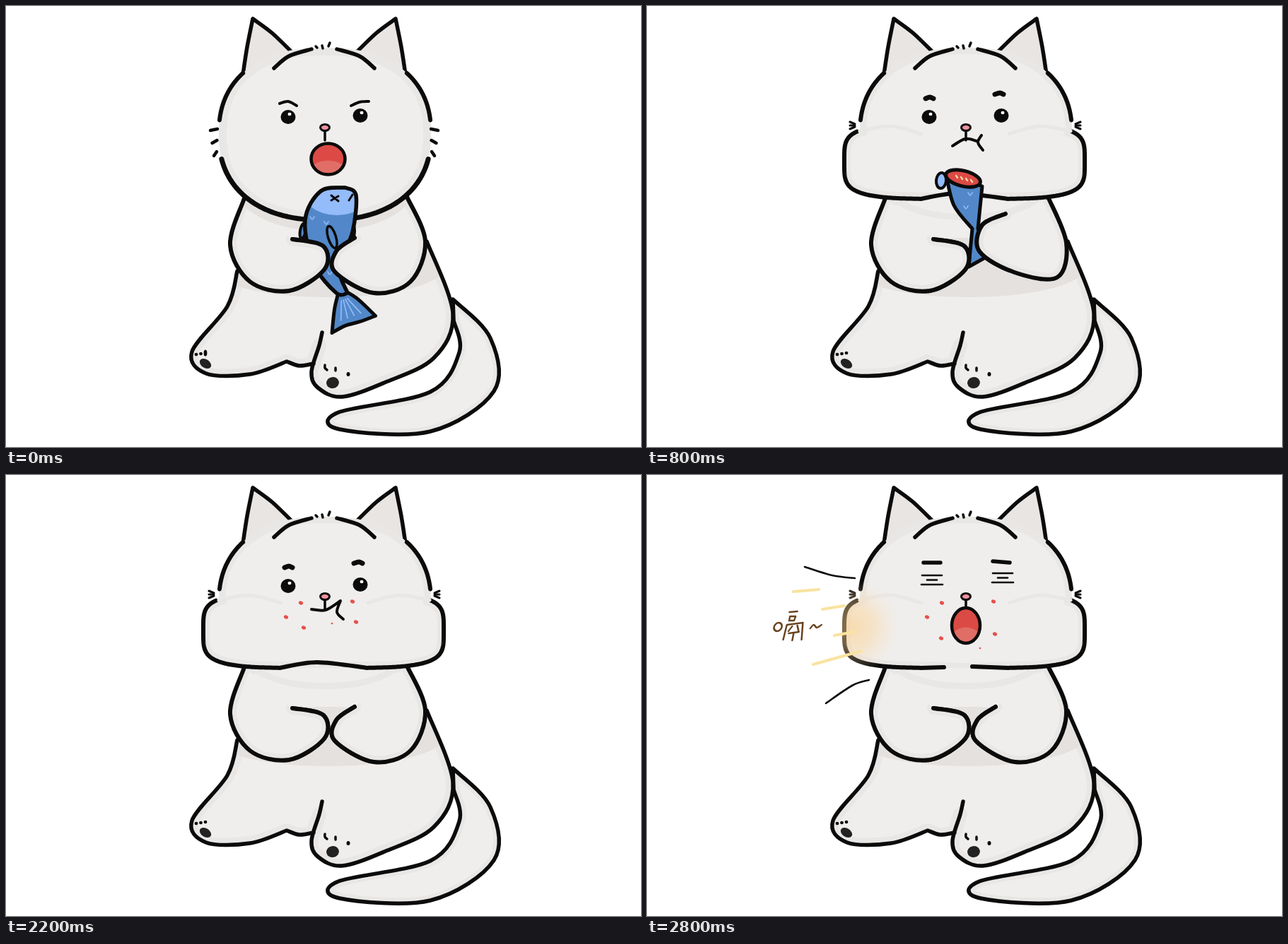
These frames come from a looping animation (898 px wide and 624 px high, 3 s). An HTML page with a canvas:

```html
<!DOCTYPE html>
<html lang="en">
<head>
<meta charset="utf-8">
<title>Cat eats a fish</title>
<style>
  html, body { margin: 0; width: 100%; height: 100%; overflow: hidden; background: #fff; }
  canvas { display: block; width: 898px; height: 624px; }
</style>
</head>
<body>
<canvas width="898" height="624" role="img" aria-label="A cat eats a fish and burps: 嗝~"></canvas>
<script>
const ctx = document.querySelector('canvas').getContext('2d');
const INK = '#0b0b0b', FUR = '#efeeec', SHADE = '#e4e1df', RIM = '#e9e7e5';
const BLUE = '#5288c9', SKY = '#94bbfa', RED = '#dc4a45', TONGUE = '#e06e66', BROWN = '#67431f';
const STEP = 200, STEPS = 15;

// Smooth line through key points; "/" makes a corner, ";" starts a new line, "z" closes it.
function curve(spec) {
  if (spec instanceof Path2D) return spec;
  const path = new Path2D();
  for (const sub of spec.split(';')) {
    let last;
    for (const piece of sub.replace('z', '').split('/')) {
      const pts = piece.trim().split(/\s+/).map(s => s.split(',').map(Number));
      if (last) pts.unshift(last); else path.moveTo(...pts[0]);
      for (let i = 1; i < pts.length; i++) {
        const a = pts[i - 1], b = pts[i], before = pts[i - 2] || a, after = pts[i + 1] || b;
        path.bezierCurveTo(
          a[0] + (b[0] - before[0]) / 6, a[1] + (b[1] - before[1]) / 6,
          b[0] - (after[0] - a[0]) / 6, b[1] - (after[1] - a[1]) / 6, ...b);
      }
      last = pts[pts.length - 1];
    }
    if (sub.includes('z')) path.closePath();
  }
  return path;
}

// Part of a superellipse, in degrees clockwise from the right.
function arc({ x, y, rx, ry, n }, from = 0, to = 360) {
  const path = new Path2D(), power = v => Math.sign(v) * Math.abs(v) ** (2 / n);
  for (let deg = from; deg <= to; deg++) {
    const a = deg * Math.PI / 180;
    path.lineTo(x + rx * power(Math.cos(a)), y + ry * power(Math.sin(a)));
  }
  return path;
}

function fill(spec, color) {
  ctx.fillStyle = color;
  ctx.fill(curve(spec));
}

function line(spec, width = 5.5, color = INK) {
  ctx.lineWidth = width;
  ctx.strokeStyle = color;
  ctx.stroke(curve(spec));
}

function shape(spec, color, width = 5) {
  fill(spec, color);
  line(spec, width);
}

function oval(x, y, rx, ry, color, turn = 0, width = 0) {
  const path = new Path2D();
  path.ellipse(x, y, rx, ry, turn, 0, Math.PI * 2);
  fill(path, color);
  if (width) line(path, width);
}

function scoped(draw) {
  ctx.save();
  draw();
  ctx.restore();
}

function within(path, draw) {
  scoped(() => { ctx.clip(path); draw(); });
}

// Paints only where something is painted already.
function atop(draw) {
  scoped(() => { ctx.globalCompositeOperation = 'source-atop'; draw(); });
}

function mirrored(draw) {
  draw();
  scoped(() => { ctx.translate(900, 0); ctx.scale(-1, 1); draw(); });
}

function furry(spec, rim) {
  fill(spec, FUR);
  within(curve(spec), () => line(spec, rim, RIM));
}

function body(step) {
  const tail = '632,415 685,470 690,545 600,602 472,599 470,575 600,546 641,490 633,445 z';
  const left = '327,375 313,425 263,489 283,520 345,521 397,503 / 415,509 435,506';
  const right = '443,480 432,518 441,540 475,553 535,533 605,498 632,435 595,333';
  const torso = `337,272 / ${left} / ${right} / 567,270 z`;
  furry(tail, 16);
  line(tail);
  furry(torso, 20);
  within(curve(torso), () => oval(455, 370, 165, 42, SHADE));
  line(`${left};447,462 ${right}`);

  oval(282, 506, 9, 6, '#222', .6);
  for (let i = 0; i < 3; i++) oval(269 + 6.5 * i, 493 - i, 2.4, step < 2 && i === 2 ? 4.5 : 2.3, INK);
  oval(462, 533, 9, 8, '#222', -.2);
  line('451,508 451,512 454,515;466,512 466,516', 3.5);
  oval(484, 521, 2.5, 3, INK);
}

const LEFT_ARM = '337,272 317,338 345,390 400,403 450,373 449,340 405,330';
const LOW_ARM = '567,270 593,333 572,390 520,406 465,376 467,347 493,328';
const HIGH_ARM = '567,270 593,335 580,384 520,377 470,347 474,310 507,294';
const armsAt = step => [LEFT_ARM, step >= 4 && step < 8 ? HIGH_ARM : LOW_ARM];

const armFur = step => armsAt(step).forEach(arm => furry(arm, 18));
const armLines = step => armsAt(step).forEach(arm => line(arm, 6));

function paws(step) {
  const area = new Path2D();
  area.rect(398, 285, 114, 126);
  within(area, () => { armFur(step); armLines(step); });
}

const SKULL = { x: 451, y: 181, rx: 150, ry: 122, n: 2.3 };
const CHEEKS = { x: 449, y: 220, rx: 170, ry: 53, n: 4.3 };

function chinShadow(step) {
  const face = step < 2 ? SKULL : CHEEKS, drop = step < 2 ? 15 : 38;
  if (step < 4) atop(() => fill(arc({ ...face, y: face.y + drop }), SHADE));
}

function ears() {
  mirrored(() => {
    const ear = '335,97 341,58 349,18 / 376,38 405,66';
    fill(`${ear} / 378,110 z`, '#e8e5e3');
    line(ear);
  });
}

function roundFace() {
  furry(arc(SKULL), 22);
  line(arc(SKULL, 14, 166), 7);
  mirrored(() => {
    for (let i = 0; i < 3; i++) line(`${299 - i / 2},${174 + 16 * i} ${289 + 2.5 * i},${176 + 18 * i}`, 4.5);
  });
}

function puffedFace(step) {
  furry(arc(SKULL), 18);
  furry(arc(CHEEKS), 18);
  fill(arc({ ...SKULL, rx: 139, ry: 85 }), FUR);
  const chin = step >= 12 ? '387,273 420,272;460,271 511,273'
    : step === 9 || step === 10 ? '387,273 511,273' : '387,273 440,265 511,273';
  line(arc(CHEEKS, 97, 218), 6);
  line(arc(CHEEKS, -38, 83), 6);
  line(chin, 6);
  mirrored(() => {
    line('301,177 345,170 388,181', 5, RIM);
    for (let i = -1; i <= 1; i++) line(`${294},${169 + 2 * i} ${287},${169 + 5 * i}`, 3);
  });
}

function head(step) {
  ears();
  if (step < 2) roundFace(); else puffedFace(step);
  line(arc(SKULL, 187, 222), 6);
  line(arc(SKULL, 318, 353), 6);
  mirrored(() => line('379,88 400,71 432,61'));
  line('438,57 440,59;447,56 448,60;458,52 456,57', 3.5);
}

function eyes(step) {
  if (step >= 12) {
    line('391,124 415,124;489,122 513,124');
    for (const [x, y] of [[403, 142], [503, 139]]) {
      [14, 7, 15].forEach((half, i) => line(`${x - half},${y + 6.5 * i} ${x + half},${y + 6.5 * i}`, 2.6));
    }
    return;
  }
  for (const [x, y] of [[399, 157], [501, 155]]) {
    oval(x, y, 10.5, 10, INK);
    oval(x + 2, y - 4, 2.5, 2.3, '#fff');
  }
  if (step < 2) line('387,138 399,135 411,141;488,141 500,136 513,135', 4);
  else line('394,131 400,129 405,131;492,125 499,123 504,125', 7);
}

function openMouth(x, y, rx, ry) {
  const lips = new Path2D();
  lips.ellipse(x, y, rx, ry, 0, 0, Math.PI * 2);
  fill(lips, RED);
  within(lips, () => oval(x, y + ry, rx * 1.2, ry * .9, TONGUE));
  line(lips, 4.5);
}

function muzzle(step) {
  line('451,177 451,190', 3.5);
  oval(451, 172, 6.5, 4.5, '#f193a0', 0, 3);
  if (step < 2) openMouth(455.5, 216.5, 24, 22);
  else if (step >= 12) openMouth(451, 213, 20, 25);
  else if (step % 2 === 0) line('432,198 450,188 466,191;473,183 468,193 475,204', 4);
  else line('432,190 452,191 473,178 / 468,194 477,204', 4);
}

function tailFan(x, y, turn) {
  scoped(() => {
    ctx.translate(x, y);
    ctx.rotate(turn);
    shape('-6,0 -18,18 -33,48 / -12,45 10,47 33,47 / 18,16 6,0 z', BLUE);
    for (let i = -1.5; i < 2; i++) line(`${3 * i},10 ${10 * i},36`, 1.7, SKY);
  });
}

function scales(...spots) {
  for (const [x, y] of spots) line(`${x - 3},${y - 2} ${x},${y + 2} ${x + 3},${y - 2}`, 1.6, SKY);
}

function bite(x, y, rx, ry, turn) {
  oval(x, y, rx, ry, RED, turn, 5);
  for (let i = -1; i <= 2; i++) line(`${x + 7 * i - 3},${y + 2 * i - 2} ${x + 7 * i - 1},${y + 2 * i + 1}`, 2.3, '#f6d8a0');
}

function wholeFish() {
  const trunk = '480,257 495,268 490,320 471,370 483,406 / 467,406 435,365 423,303 445,262 480,257 z';
  oval(420, 318, 4, 11, BLUE, .2, 4);
  oval(489, 318, 4, 11, BLUE, 0, 4);
  tailFan(475, 406, -.36);
  fill(trunk, BLUE);
  within(curve(trunk), () => oval(468, 255, 52, 41, SKY));
  line(trunk);
  line('460,268 470,276;470,269 460,275;490,267 485,275', 3);
  oval(461, 327, 5.5, 16, BLUE, -.3, 3.5);
  scales([433, 300], [453, 307], [458, 378]);
}

function bittenFish() {
  oval(417, 305, 6, 18, SKY, .1, 4);
  oval(484, 298, 5, 9, SKY, 0, 4);
  tailFan(470, 379, -.36);
  shape('432,252 420,285 435,338 462,380 / 472,380 473,335 487,275 z', BLUE);
  bite(460, 257, 29, 15, .35);
  oval(459, 301, 7, 16, BLUE, -.3, 3.5);
  scales([432, 272], [450, 280], [440, 305], [459, 331]);
}

function halfFish() {
  oval(416, 247, 7, 11, SKY, .1, 4);
  shape('423,238 434,282 460,315 / 455,369 / 480,355 / 468,315 / 474,255 z', BLUE);
  bite(447, 244, 25, 11, .24);
  scales([457, 266], [451, 285]);
}

function stubFish() {
  shape('450,279 461,318 / 455,369 / 480,355 / 469,315 / 489,284 z', BLUE);
  bite(470, 280, 20, 8, .15);
}

function fish(step) {
  if (step < 2) {
    scoped(() => { ctx.translate(-step, -15 * step); wholeFish(); });
  } else if (step < 4) bittenFish();
  else if (step < 6) halfFish();
  else if (step < 8) stubFish();
  else if (step === 8) tailFan(452, 192, .04);
}

function crumbs(step) {
  if (step < 10) return;
  const low = step >= 12 ? [[416, 231], [471, 245], [492, 225]] : [[421, 216], [461, 210], [495, 208]];
  [[417, 181], [396, 201], [490, 179], ...low].forEach(([x, y], i) => {
    const size = i === 4 ? 1.5 : 3.2;
    oval(x, y, size, size * .8, '#e5504b', .5);
  });
}

function glow(step) {
  if (step < 12) return;
  const i = step - 12, x = [445, 338, 290][i], y = 215, r = 95 - 14 * i;
  const light = ctx.createRadialGradient(x, y, 0, x, y, r);
  light.addColorStop(0, 'rgba(255,205,130,.55)');
  light.addColorStop(.45, 'rgba(255,210,145,.4)');
  light.addColorStop(1, 'rgba(255,220,190,0)');
  atop(() => {
    ctx.fillStyle = light;
    ctx.fillRect(x - r, y - r, 2 * r, 2 * r);
  });
}

function burpWord() {
  oval(241, 219, 5.5, 6, 'transparent');
  const ring = new Path2D();
  ring.ellipse(241, 219, 5.5, 6, 0, 0, Math.PI * 2);
  line(ring, 2.6, BROWN);
  line('253,198 264,197;255,204 / 263,204 / 262,210 / 255,210 z', 2.4, BROWN);
  line('252,237 / 253,216 / 275,213 / 278,237;261,218 257,225;268,217 271,224;258,228 272,226;265,227 265,238', 2.5, BROWN);
  line('287,221 291,216 296,220 302,216', 2.4, BROWN);
}

function burp(step) {
  if (step < 12) return;
  scoped(() => {
    if (step === 14) {
      line('223,130 262,142 294,146;253,323 290,298 314,290', 2.6);
      line('207,165 243,162;248,190 279,185;265,227 293,222;235,268 303,249', 4, '#f9e3a0');
      ctx.transform(1, 0, -.2, 1, -12, -4);
    } else {
      if (step === 12) ctx.translate(41, -16);
      line('258,149 300,154 345,159 367,169;262,302 297,290 345,280 385,261', 2.4, '#54381f');
      line('303,184 333,185;277,197 311,199;260,257 322,235;299,267 357,241', 3.5, '#fbe8a2');
    }
    burpWord();
  });
}

function draw(step) {
  ctx.clearRect(0, 0, 898, 624);
  ctx.lineCap = ctx.lineJoin = 'round';
  for (const part of [body, armFur, chinShadow, armLines, head, glow, eyes, muzzle, crumbs, fish, paws, burp]) part(step);
}

let shown = -1;
function tick() {
  const step = Math.floor(performance.now() / STEP) % STEPS;
  if (step !== shown) draw(shown = step);
  requestAnimationFrame(tick);
}
tick();
</script>
</body>
</html>
```
